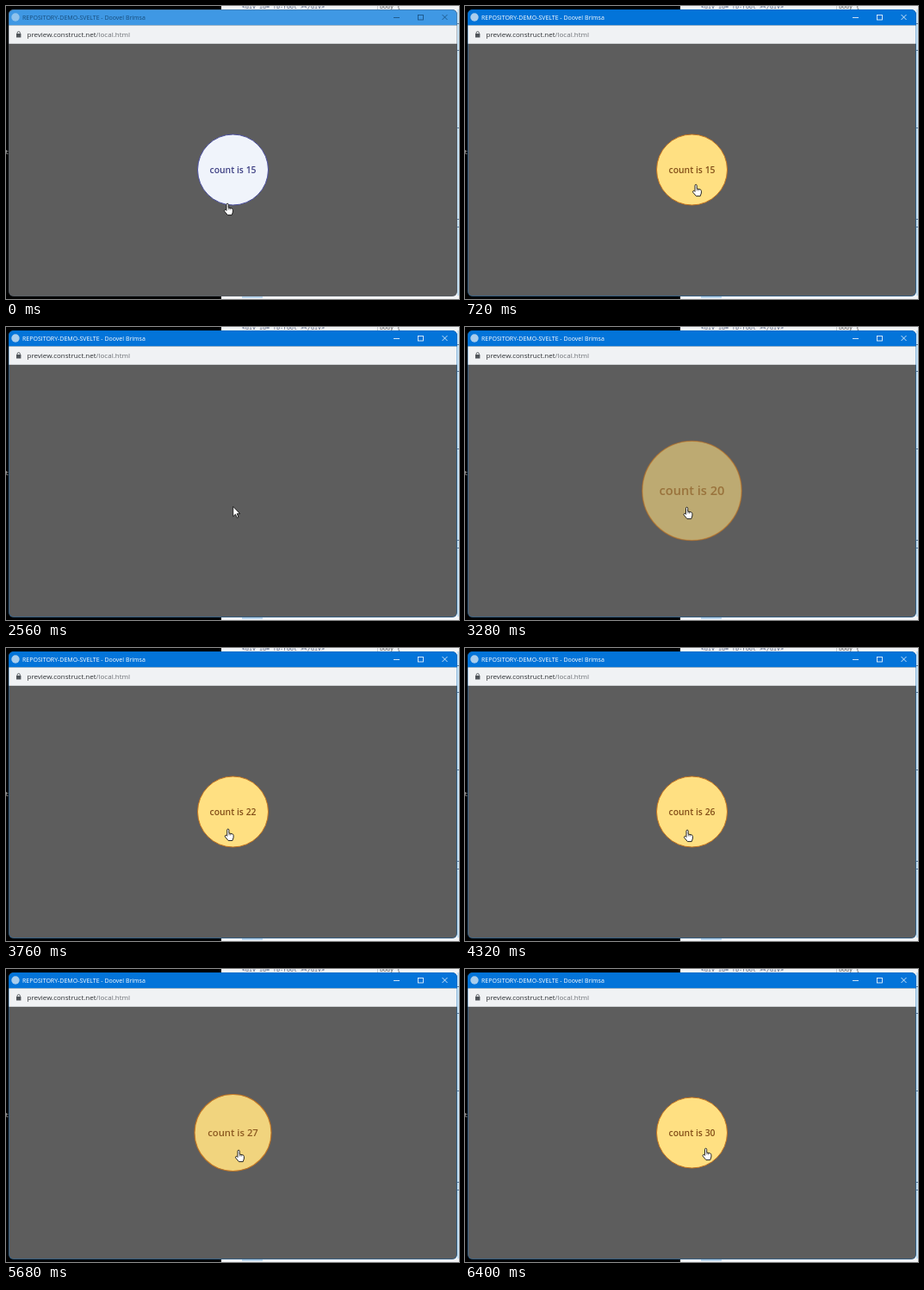
Animation of 526x340 px, one loop 6.48 s. Source, as an HTML page with a canvas:

```html
<!DOCTYPE html>
<html lang="en">
<head>
<meta charset="utf-8">
<title>Counter button</title>
<style>
html, body { margin: 0; width: 100%; height: 100%; overflow: hidden; background: #000; }
canvas { display: block; }
</style>
</head>
<body>
<canvas id="stage" width="526" height="340"></canvas>
<script>
const ctx = document.getElementById('stage').getContext('2d');
const LOOP = 6480, STEP = 80, FADE = 400, FOCUS = 400;
const SANS = '"Open Sans", "Noto Sans", sans-serif';
const MONO = '"DejaVu Sans Mono", monospace';

const clicks = [800, 960, 1120, 1280, 1440, 3520, 3680, 3840, 4000, 4160, 4300, 4460, 5920, 6080, 6240];
const hidden = [[2000, 3176], [4640, 5456]];   // leave and enter start times
const track = [   // time, x, y of the pointer
  [0, 253, 229], [480, 264, 207], [800, 264, 207], [1600, 264, 208], [2300, 264, 208],
  [3000, 253.5, 209], [3280, 253.5, 209], [4320, 254, 211], [4800, 254, 211],
  [5440, 266, 210], [5760, 266, 210], [6320, 275.5, 208], [6480, 275.5, 208]
];
const hand = new Path2D('M3 7.5V1.3a1.1 1.1 0 0 1 2.2 0V5l3.9.9q1.3.4 1.3 1.7V10L9.2 13.6H4.4L.7 9.2Q.1 7.9 1.3 7.3Q2 7 3 8.4Z');
const arrow = new Path2D('M3 0V11.5L5.7 9L7.5 13L9.2 12.2L7.5 8.4H11Z');

const clamp = v => Math.min(1, Math.max(0, v));
const mix = (a, b, k) => a + (b - a) * k;
const blend = (a, b, k) => `rgb(${a.map((v, i) => mix(v, b[i], k)).join()})`;

function rect(color, x, y, w, h) {
  ctx.fillStyle = color;
  ctx.fillRect(x, y, w, h);
}

function text(str, x, y, font, color) {
  ctx.font = font;
  ctx.fillStyle = color;
  ctx.fillText(str, x, y);
  return x + ctx.measureText(str).width;
}

function line(color, width, ...points) {
  ctx.strokeStyle = color;
  ctx.lineWidth = width;
  ctx.beginPath();
  points.forEach(([x, y], i) => i ? ctx.lineTo(x, y) : ctx.moveTo(x, y));
  ctx.stroke();
}

function pointerAt(t) {
  const i = track.findIndex(p => p[0] > t);
  const [t0, x0, y0] = track[i - 1], [t1, x1, y1] = track[i];
  const k = (t - t0) / (t1 - t0), ease = k * k * (3 - 2 * k);
  return [mix(x0, x1, ease), mix(y0, y1, ease)];
}

// 0 = button in place, 1 = fully scaled out and transparent
function awayAt(t) {
  return Math.max(...hidden.map(([out, back]) =>
    t < back ? clamp((t - out) / FADE) ** 3 : (1 - clamp((t - back) / FADE)) ** 3));
}

function drawDesktop() {
  rect('#000', 0, 0, 526, 340);
  rect('#f3f4f6', 250, 0, 276, 340);
  rect('#b8d4ec', 274, 337, 24, 2);
  rect('#c4c8cc', 431, 0, 1, 4);
  text('<div id="fb-root"></div>', 274, 3, '6.65px ' + MONO, '#4a5878');
  text('body {', 434, 3, '6.65px ' + MONO, '#555');
  text('t', -1, 172, '7px ' + MONO, '#ccc');
  rect('#c6e2f6', 524, 4, 2, 332);
  for (const y of [20, 51, 141, 247, 256]) rect('#58779a', 524, y, 2, 1);
}

function drawWindow(active) {
  const ink = active ? '#fff' : '#174d7c';
  ctx.save();
  ctx.beginPath();
  ctx.roundRect(3, 4, 521, 333, 6);
  ctx.clip();
  rect('#5d5d5d', 3, 4, 521, 333);
  rect(active ? '#0374d9' : '#3f98e4', 3, 4, 521, 18.5);
  rect('#f0f2f4', 3, 22.5, 521, 21);
  rect('#d0d3d6', 3, 43, 521, 1);
  ctx.strokeStyle = active ? 'rgba(0,100,185,.55)' : 'rgba(80,95,110,.5)';
  ctx.lineWidth = 1.5;
  ctx.stroke();
  ctx.restore();

  ctx.fillStyle = active ? '#a9cdec' : '#8fc2ec';
  ctx.beginPath();
  ctx.arc(11, 13, 4.7, 0, 7);
  ctx.fill();
  text('REPOSITORY-DEMO-SVELTE - Doovel Brimsa', 19, 15.7, '7px ' + SANS, ink);
  line(ink, 0.8, [450, 13.5], [457, 13.5]);
  ctx.strokeRect(478.5, 10.5, 6, 5.5);
  line(ink, 0.8, [506.5, 10], [512.5, 16]);
  line(ink, 0.8, [512.5, 10], [506.5, 16]);

  rect('#50555a', 12, 32, 5.4, 4.5);
  ctx.strokeStyle = '#50555a';
  ctx.lineWidth = 0.9;
  ctx.beginPath();
  ctx.arc(14.7, 31.2, 1.6, Math.PI, 0);
  ctx.lineTo(16.3, 32.5);
  ctx.moveTo(13.1, 31.2);
  ctx.lineTo(13.1, 32.5);
  ctx.stroke();
  const x = text('preview.construct.net', 24.5, 36, '8px ' + SANS, '#2c2f33');
  text('/local.html', x, 36, '8px ' + SANS, '#6c7075');
}

function drawButton(t, away) {
  const hover = clamp((t - 80) / 250);
  const count = 15 + clicks.filter(c => c <= t).length;
  ctx.save();
  ctx.globalAlpha = 1 - away;
  ctx.translate(263.5, 190);
  ctx.scale(1 + away, 1 + away);
  ctx.beginPath();
  ctx.arc(0, 0, 41, 0, 7);
  ctx.fillStyle = blend([240, 244, 251], [255, 224, 130], hover);
  ctx.fill();
  ctx.strokeStyle = blend([76, 80, 160], [196, 116, 32], hover);
  ctx.lineWidth = 1;
  ctx.stroke();
  ctx.textAlign = 'center';
  text('count is ' + count, 0, 3.9, '600 10.4px ' + SANS, blend([62, 64, 132], [130, 78, 24], hover));
  ctx.restore();
}

function drawPointer(t, shape) {
  ctx.save();
  ctx.translate(...pointerAt(t));
  ctx.fillStyle = '#fff';
  ctx.strokeStyle = '#111';
  ctx.lineWidth = 0.9;
  ctx.lineJoin = 'round';
  ctx.fill(shape);
  ctx.stroke(shape);
  if (shape === hand) {
    line('#111', 0.6, [5.3, 5.2], [5.3, 7.4]);
    line('#111', 0.6, [7.2, 5.8], [7.2, 7.6]);
  }
  ctx.restore();
}

function frame() {
  const t = Math.floor(performance.now() % LOOP / STEP) * STEP;
  const away = awayAt(t);
  drawDesktop();
  drawWindow(t >= FOCUS);
  if (away < 1) drawButton(t, away);
  drawPointer(t, away < 1 ? hand : arrow);
  requestAnimationFrame(frame);
}
frame();
</script>
</body>
</html>
```
